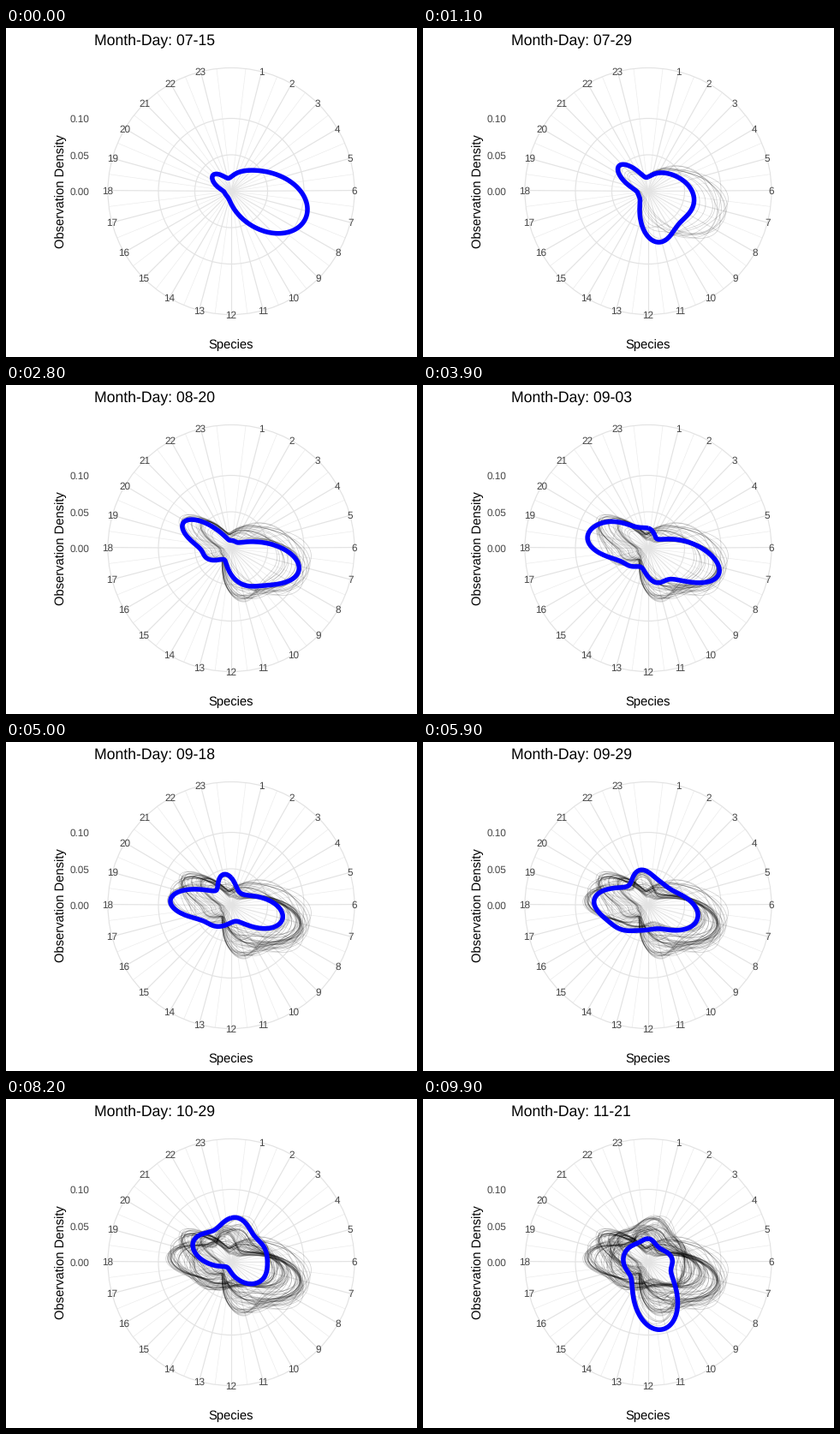
Animation, 480 px wide and 384 px high, one loop 10000 ms. Source, as a matplotlib script:

```python
import numpy as np
import matplotlib.pyplot as plt
from matplotlib.animation import FuncAnimation
from matplotlib.collections import LineCollection
from matplotlib.patches import Circle

plt.rcParams["font.family"] = "Liberation Sans"
plt.rcParams["text.hinting"] = "none"

W, H, DPI = 480, 384, 100
PX = 72 / DPI                 # points per pixel
CX, CY, RIM, RING = 263, 190.5, 144, 42.5
FRAMES, DAYS = 100, 129
EDGE = 0.05                   # hours missing at each end of the clock
GRID, GRID_MINOR, TICK = "#e3e3e3", "#ebebeb", "#464646"

# Step: floor radius and the activity peaks as (hour, height, spread)
POSES = {
    0: (7.5, [(7.4, 81, 2.1), (3, 18, 2.5), (20.7, 20, 1.2)]),
    11: (12, [(7.2, 42, 2.3), (11.4, 40, 1.4), (20.7, 33, 1.1), (2.7, 10, 2)]),
    28: (9, [(7, 62, 1.3), (10, 38, 1.9), (19.9, 52, 1.1), (16.9, 22, 1.4)]),
    50: (17, [(7, 45, 1.5), (18.4, 48, 1.1), (15.6, 16, 2), (23.1, 20, 1.2)]),
    69: (25, [(6.5, 18, 2), (17, 18.5, 2.4), (1, 13.5, 1.3)]),
    82: (7, [(7.7, 34, 2.2), (19.9, 42, 1.7), (0.4, 43, 1.7), (4.1, 22, 1.5)]),
    99: (20, [(11.2, 60, 1.7), (5.6, 8, 1.4), (19, 9.5, 2.6), (0.1, 6, 1)]),
}
STEPS = list(POSES)
ANGLE = np.linspace(0, 2 * np.pi, 260)


def profile(floor, peaks):
    r = np.full(ANGLE.shape, float(floor))
    for hour, height, spread in peaks:
        gap = (ANGLE * 12 / np.pi - hour + 12) % 24 - 12
        r += height * np.exp(-0.5 * (gap / spread) ** 2)
    return r


def polar(r, angle):
    return np.column_stack([CX + r * np.sin(angle), CY - r * np.cos(angle)])


def clock(hour):
    return 2 * np.pi * (hour - EDGE) / (24 - 2 * EDGE)


def make_curves():
    """Blend the poses; between them the curve swells and wavers."""
    rng = np.random.default_rng(7)
    orders = np.arange(2, 8)
    waves = np.exp(1j * np.outer(orders, ANGLE))
    coef = rng.normal(size=(FRAMES, 6)) + 1j * rng.normal(size=(FRAMES, 6))
    coef = (coef + np.roll(coef, 1, axis=0)) / 2
    waver = 0.04 * (coef @ waves).real

    shapes = [profile(*p) for p in POSES.values()]
    curves = []
    for i in range(FRAMES):
        pos = np.interp(i, STEPS, range(len(STEPS)))
        k = min(int(pos), len(STEPS) - 2)
        u = pos - k
        r = shapes[k] * (1 - u) + shapes[k + 1] * u
        r *= 1 + np.sin(np.pi * u) * (0.17 + waver[i])
        curves.append(polar(r, ANGLE))
    return curves


CURVES = make_curves()

fig = plt.figure(figsize=(W / DPI, H / DPI), dpi=DPI, facecolor="white")
ax = fig.add_axes([0, 0, 1, 1])
ax.set_xlim(0, W)
ax.set_ylim(H, 0)
ax.axis("off")


def label(x, y, text, size, color="black", **kw):
    return ax.text(x, y, text, fontsize=size * PX, color=color, zorder=6, **kw)


def spokes(hours, color, width):
    ends = [polar(np.array([0, RIM]), clock(h)) for h in hours]
    ax.add_collection(LineCollection(ends, colors=color, linewidths=width * PX,
                                     zorder=1))


spokes(np.arange(0.5, 24), GRID_MINOR, 0.65)
spokes(range(1, 24), GRID, 1.2)
for radius in (RING, 2 * RING, RIM):
    ax.add_patch(Circle((CX, CY), radius, fill=False, ec=GRID, lw=1.2 * PX,
                        zorder=2))

for h in range(1, 24):
    x, y = polar(RIM, clock(h))[0]
    label(x, y + 4.2, str(h), 11.7, TICK, ha="center")
for n in range(3):
    label(97.5, CY - RING * n + 4.4, f"{n * 0.05:.2f}", 11.7, TICK, ha="right")
label(CX, 374, "Species", 14.7, ha="center")
label(67.5, CY, "Observation Density", 14.7, ha="center", rotation=90,
      rotation_mode="anchor")
title = label(103, 19.6, "", 17.6)

trails = LineCollection([], colors=[(0, 0, 0, 0.18)], linewidths=0.75 * PX,
                        zorder=3)
ax.add_collection(trails, autolim=False)
line, = ax.plot([], [], color="#0000ff", lw=5.5 * PX, zorder=4,
                solid_capstyle="butt", solid_joinstyle="round")


def update(i):
    day = np.datetime64("2021-07-15") + DAYS * i // (FRAMES - 1)
    title.set_text("Month-Day: " + str(day)[5:])
    trails.set_segments(CURVES[:i])
    line.set_data(*CURVES[i].T)
    return title, trails, line


anim = FuncAnimation(fig, update, frames=FRAMES, interval=100, repeat=True,
                     repeat_delay=0, blit=False)
plt.show()
```
